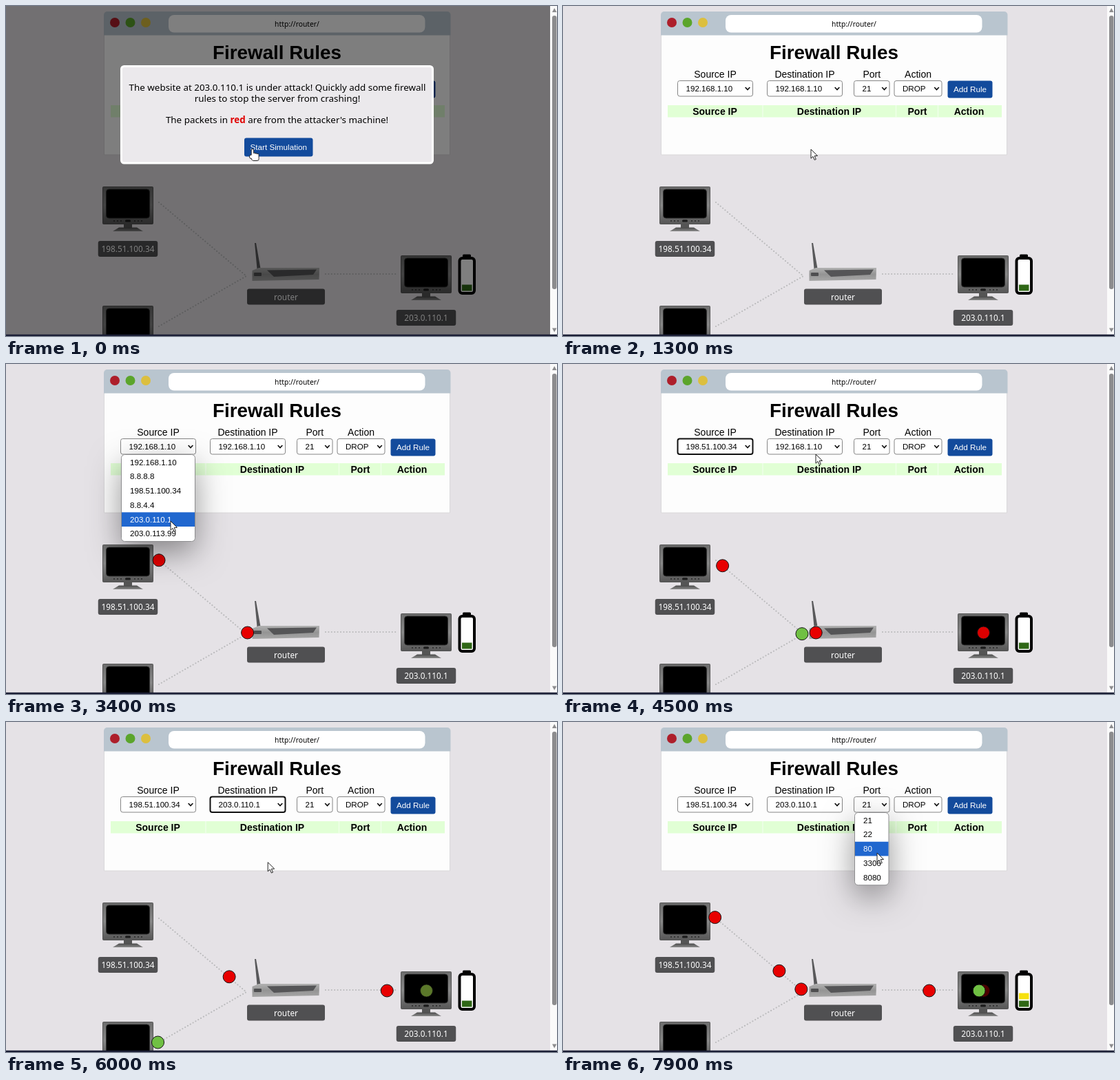
Write an HTML page with a canvas that moves like this. It is 800 by 479 pixels and loops after 8000 ms.

```html
<!DOCTYPE html>
<html lang="en">
<head>
<meta charset="utf-8">
<title>Firewall Rules</title>
<style>
html, body { margin: 0; width: 100%; height: 100%; overflow: hidden; background: #e5e2e6; }
canvas { display: block; width: 800px; height: 479px; }
</style>
</head>
<body>
<canvas id="stage"></canvas>
<script>
const W = 800, H = 479, LOOP = 8000, STEP = 100;
const canvas = document.getElementById('stage');
const ctx = canvas.getContext('2d');
const dpr = window.devicePixelRatio || 1;
canvas.width = W * dpr;
canvas.height = H * dpr;

const ARIAL = '"Liberation Sans", Arial, sans-serif';
const HUMAN = '"Noto Sans", "Open Sans", sans-serif';
const SMALL = '11.6px ' + ARIAL, LABEL = '14px ' + ARIAL;
const RED = '#e80000', GREEN = '#70c043', BLUE = '#134b9c';

const HOSTS = ['192.168.1.10', '8.8.8.8', '198.51.100.34', '8.8.4.4', '203.0.110.1', '203.0.113.99'];
const PORTS = ['21', '22', '80', '3306', '8080'];
const ROW_TOP = 132.3, ROW_H = 20.75;

const MODAL_END = 1100, LOAD_UP = 6300;

// Drop-downs, each with its left edge, width, chosen row and open time
const MENUS = [
  { label: 'Source IP', x: 166, w: 110, items: HOSTS, pick: 2, open: 2600, close: 4000 },
  { label: 'Destination IP', x: 296, w: 110, items: HOSTS, pick: 4, open: 4750, close: 5700 },
  { label: 'Port', x: 422, w: 52.5, items: PORTS, pick: 2, open: 6600, close: LOOP }
];

// Each stream sends a packet at a fixed interval
const STREAMS = [
  { first: 2350, every: 980, y: 283.5, color: RED },
  { first: 3580, every: 2420, y: 465, color: GREEN },
  { first: 7000, every: 880, y: 283.5, color: RED }
];
const PACKETS = STREAMS.flatMap(s => {
  const sent = [];
  for (let at = s.first; at < LOOP; at += s.every) sent.push({ ...s, at });
  return sent;
}).sort((a, b) => a.at - b.at);

// Pointer stops: time, x, y
const STOPS = [
  [1900, 360, 208], [2500, 240, 122], [2800, 240, 122], [3400, 239, 228], [3900, 237, 186],
  [4100, 237, 186], [4500, 367, 131], [4850, 367, 128], [5400, 364, 224], [5800, 364, 224],
  [6500, 450, 116], [7000, 450, 116], [7700, 456, 190]
];

const swing = p => 0.5 - Math.cos(Math.PI * p) / 2;
const mix = (a, b, p) => a + (b - a) * p;
const clamp = (v, lo, hi) => Math.max(lo, Math.min(hi, v));

function pointer(t) {
  let i = 1;
  while (i < STOPS.length - 1 && STOPS[i][0] < t) i++;
  const [t0, x0, y0] = STOPS[i - 1], [t1, x1, y1] = STOPS[i];
  const p = swing(clamp((t - t0) / (t1 - t0), 0, 1));
  return [mix(x0, x1, p), mix(y0, y1, p)];
}

function paint(fill, stroke, lw = 1) {
  if (fill) { ctx.fillStyle = fill; ctx.fill(); }
  if (stroke) { ctx.strokeStyle = stroke; ctx.lineWidth = lw; ctx.stroke(); }
}

function box(x, y, w, h, r, fill, stroke, lw) {
  ctx.beginPath();
  ctx.roundRect(x, y, w, h, r);
  paint(fill, stroke, lw);
}

function poly(points, fill, stroke) {
  ctx.beginPath();
  for (let i = 0; i < points.length; i += 2) ctx.lineTo(points[i], points[i + 1]);
  ctx.closePath();
  paint(fill, stroke);
}

function disc(x, y, r, fill, stroke) {
  ctx.beginPath();
  ctx.arc(x, y, r, 0, 7);
  paint(fill, stroke);
}

function text(str, x, y, font, color = '#000', align = 'center') {
  ctx.font = font;
  ctx.fillStyle = color;
  ctx.textAlign = align;
  ctx.fillText(str, x, y);
}

function shade(y0, y1, ...colors) {
  const g = ctx.createLinearGradient(0, y0, 0, y1);
  colors.forEach((c, i) => g.addColorStop(i / (colors.length - 1), c));
  return g;
}

function dotted(x0, y0, x1, y1) {
  ctx.save();
  ctx.setLineDash([0, 4.4]);
  ctx.lineCap = 'round';
  ctx.beginPath();
  ctx.moveTo(x0, y0);
  ctx.lineTo(x1, y1);
  paint(null, '#bababc', 2.2);
  ctx.restore();
}

function tag(str, x, y, w) {
  box(x - w / 2, y, w, 23, 3, '#505052');
  text(str, x, y + 16, '500 11.8px ' + HUMAN, '#fff');
}

function monitor(x, y) {
  ctx.save();
  ctx.translate(x, y);
  box(-6, 54, 12, 7, 0, '#555');
  poly([-13, 59.5, 13, 59.5, 22, 65, -22, 65], shade(59, 65, '#444', '#8a8a8a'));
  box(-36.5, 0.5, 73, 54, 1, shade(0, 55, '#6c6c6c', '#868686', '#555'), '#555');
  box(-31.5, 4, 63, 42, 4, '#000', '#333');
  for (let d = -20; d <= 20; d += 5) if (Math.abs(d) > 5) box(d - 1, 49, 2, 1.8, 0.5, '#2c2c2c');
  box(-4, 48.3, 8, 3.2, 1.5, '#1c1c1c');
  ctx.restore();
}

function router() {
  poly([361, 344, 363, 344, 369.5, 381, 364.5, 381], '#58585a');
  poly([357.5, 384, 367, 380, 455, 380, 454.5, 397, 357.5, 399], shade(380, 399, '#b2b2b2', '#949494', '#a6a6a6'));
  poly([379, 383.5, 451, 382.5, 446, 390, 389, 393], '#555557');
  box(360, 387, 11, 5, 1, '#4e4e50');
}

function battery(t) {
  box(663, 360.5, 12, 6, 1.5, '#000');
  box(658.5, 366, 21.5, 51, 4, '#fff', '#000', 4);
  box(662, 404.5, 14.5, 9, 0, '#2f6716');
  if (t >= LOAD_UP) box(662, 393.5, 14.5, 9, 0, '#f6e10f');
}

// Host to router, router to server, then a fade: one second each
function packet({ at, y, color }, t) {
  const age = (t - at) / 1000;
  if (age < 0 || age >= 3) return;
  const p = swing(age % 1);
  ctx.globalAlpha = age < 2 ? 1 : 1 - p;
  if (age < 1) disc(mix(220.5, 349, p), mix(y, 390.5, p), 9, color, '#111');
  else disc(age < 2 ? mix(349, 610.5, p) : 610.5, 390, 9, color, '#111');
  ctx.globalAlpha = 1;
}

function network(t) {
  dotted(222, 285, 349, 392);
  dotted(222, 465, 349, 392);
  dotted(464, 389, 568, 389);
  monitor(177, 262);
  monitor(177, 435);
  monitor(610, 362);
  router();
  tag(HOSTS[2], 177, 341, 86.5);
  tag('router', 406.5, 410.5, 113);
  tag(HOSTS[4], 610, 441, 86.5);
  battery(t);
  for (const p of PACKETS) packet(p, t);
}

function select(label, value, x, w, focus) {
  text(label, x + w / 2, 104, LABEL);
  box(x + 0.5, 108.5, w - 1, 22.5, 3, '#fff', focus ? '#101010' : '#858585', focus ? 2 : 1);
  text(value, x + 12.5, 124, SMALL, '#000', 'left');
  const cx = x + w - 8;
  ctx.beginPath();
  ctx.moveTo(cx - 3.3, 118);
  ctx.lineTo(cx, 121.5);
  ctx.lineTo(cx + 3.3, 118);
  paint(null, '#111', 1.7);
}

function button(str, x, y, w, h) {
  box(x, y, w, h, 3, BLUE);
  text(str, x + w / 2, y + h / 2 + 4.2, '11.7px ' + ARIAL, '#fff');
}

function browser(t) {
  box(142.5, 40, 502, 176, 0, '#fdfdfd', '#d9d8da');
  box(142, 8, 503.5, 34.5, [5, 5, 0, 0], '#b9c5cf');
  ['#ad1f2b', '#5ba52b', '#dcbf3f'].forEach((c, i) => disc(158 + i * 22.5, 24, 7, c));
  box(236, 13, 372.5, 25.5, 8, '#fff');
  text('http://router/', 422.5, 29.5, '10.3px ' + HUMAN);
  text('Firewall Rules', 393.5, 77, 'bold 27.8px ' + ARIAL);

  MENUS.forEach((m, i) => {
    const next = MENUS[i + 1];
    const focus = t >= m.close && t < next.open;
    select(m.label, m.items[t < m.close ? 0 : m.pick], m.x, m.w, focus);
  });
  select('Action', 'DROP', 480.5, 70);
  button('Add Rule', 558.5, 108.5, 65, 25);

  box(152, 144, 485, 17.5, 0, '#e1ffd5');
  for (const x of [290, 483.5, 544.5]) box(x - 0.7, 144, 1.4, 17.5, 0, '#f0feea');
  const heads = { 'Source IP': 220.5, 'Destination IP': 386.5, 'Port': 514.5, 'Action': 589.5 };
  for (const h in heads) text(h, heads[h], 157.5, 'bold ' + LABEL);
}

function menu({ x, w, items, open }, t) {
  const left = x + 1.5, width = w - 3, h = items.length * ROW_H + 1.5;
  ctx.save();
  ctx.shadowColor = 'rgba(0,0,0,.42)';
  ctx.shadowBlur = 46 * dpr;
  ctx.shadowOffsetY = 16 * dpr;
  box(left, 131.5, width, h, 5, '#fff');
  ctx.restore();
  box(left, 131.5, width, h, 5, '#fff', '#8d8d8f');

  // The highlight trails the pointer slightly
  const y = pointer(Math.max(open, t - 60))[1];
  const hot = clamp(Math.floor((y - ROW_TOP) / ROW_H), 0, items.length - 1);
  box(left + 0.5, ROW_TOP + hot * ROW_H, width - 1, ROW_H, hot ? 0 : [4, 4, 0, 0], '#2067cf');
  items.forEach((s, i) => {
    text(s, left + 12.5, ROW_TOP + i * ROW_H + 14.4, SMALL, i === hot ? '#fff' : '#000', 'left');
  });
}

function modal() {
  box(0, 0, 790, 477, 0, 'rgba(0,0,0,.5)');
  box(167.5, 87.5, 452, 140.5, 4, '#ebe9ec', '#fff', 3);
  const font = '13.4px ' + HUMAN;
  text('The website at 203.0.110.1 is under attack! Quickly add some firewall', 394, 123, font);
  text('rules to stop the server from crashing!', 394, 139, font);

  const parts = ['The packets in ', 'red', " are from the attacker's machine!"];
  const fonts = [font, 'bold ' + font, font];
  const widths = parts.map((s, i) => { ctx.font = fonts[i]; return ctx.measureText(s).width; });
  let x = 393.5 - widths.reduce((a, b) => a + b) / 2;
  parts.forEach((s, i) => {
    text(s, x, 169.5, fonts[i], i === 1 ? '#e00000' : '#000', 'left');
    x += widths[i];
  });
  button('Start Simulation', 346, 191.5, 99.5, 27);
}

function scrollbar() {
  const gray = '#8c8c8e';
  box(790, 0, 10, H, 0, '#fafafa');
  box(793, 14, 6.5, 397, 3.2, gray);
  poly([796.2, 3, 799.5, 9, 793, 9], gray);
  poly([796.2, 473.5, 799.5, 467.5, 793, 467.5], gray);
  box(0, 476.7, W, 2.3, 0, '#1b1f36');
}

function hand() {
  ctx.beginPath();
  for (let i = 0; i < 4; i++) ctx.roundRect(-1.3 + i * 2.5, i && 5 + i * 0.6, 2.4, 9, 1.2);
  ctx.roundRect(-1.3, 7.5, 9.9, 8.5, [0, 0, 3, 3]);
  ctx.roundRect(-4, 8.5, 4, 4.5, 2);
  paint(null, '#222', 1.8);
  paint('#fff');
}

function cursor(t) {
  ctx.save();
  ctx.translate(...pointer(t));
  ctx.lineJoin = 'round';
  if (t < MODAL_END) {
    ctx.translate(-2, 0);
    hand();
  } else {
    poly([0, 0, 0, 13.2, 3, 10.4, 5.2, 15.4, 7.3, 14.5, 5.2, 9.6, 9.5, 9.4], '#fff', '#222');
  }
  ctx.restore();
}

function draw(t) {
  ctx.setTransform(dpr, 0, 0, dpr, 0, 0);
  box(0, 0, W, H, 0, '#e5e2e6');
  network(t);
  browser(t);
  for (const m of MENUS) if (t >= m.open && t < m.close) menu(m, t);
  if (t < MODAL_END) modal();
  scrollbar();
  cursor(t);
}

// The screen advances ten times a second
const begin = performance.now();
function tick() {
  const t = performance.now() - begin + 25;
  draw(Math.floor(t / STEP) * STEP % LOOP);
  requestAnimationFrame(tick);
}
tick();
</script>
</body>
</html>
```
